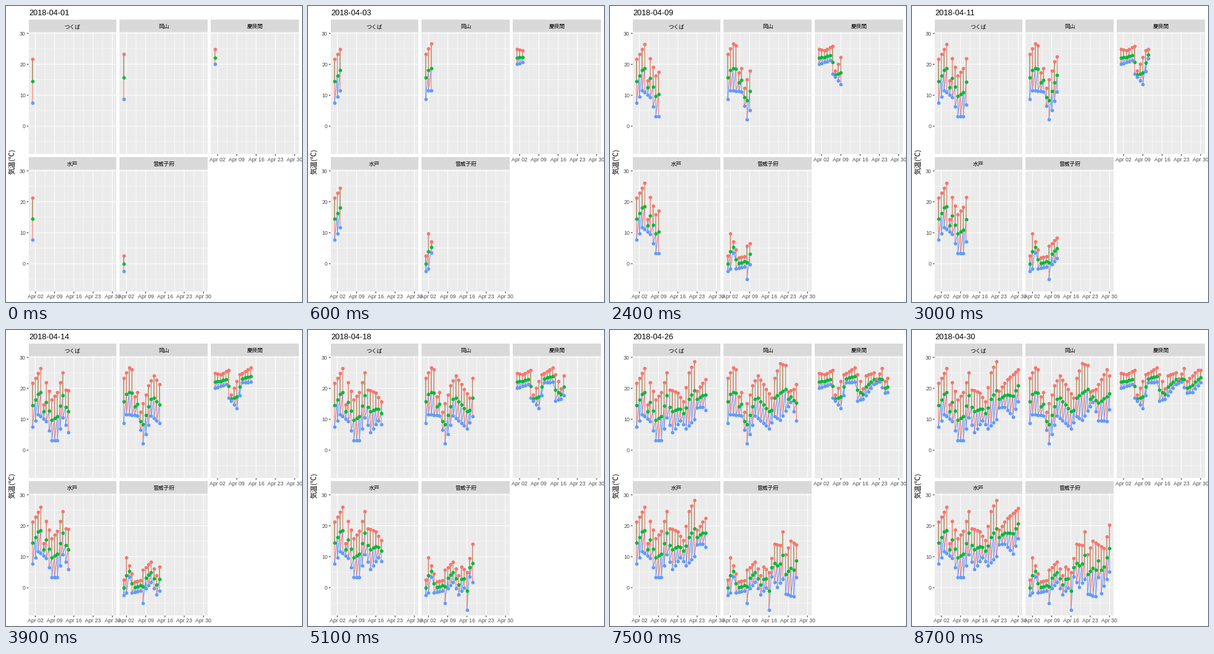
A matplotlib script for the animation above (9000 ms loop, 480x480 px).

```python
import numpy as np
import matplotlib.pyplot as plt
from matplotlib.animation import FuncAnimation
from matplotlib.collections import LineCollection
from matplotlib.patches import Rectangle

SIZE, DPI, DAYS = 480, 72, 30
RED, GREEN, BLUE = "#F8766D", "#00BA38", "#619CFF"
SANS, CJK = "Liberation Sans", "Noto Sans CJK JP"
LEFT, RIGHT, GAP = 36.6, 474.52, 5.5
PANEL_W, PANEL_H, STRIP_H = (RIGHT - LEFT - 2 * GAP) / 3, 198.0, 20.3
TOPS = (42.1, 265.1)
DAY_W, DEG_H = PANEL_W / 31.9, 5.02

fig = plt.figure(figsize=(SIZE / DPI, SIZE / DPI), dpi=DPI, facecolor="white")
ax = fig.add_axes([0, 0, 1, 1])
ax.set_xlim(0, SIZE)
ax.set_ylim(SIZE, 0)
ax.axis("off")


def rect(x, y, w, h, color):
    ax.add_patch(Rectangle((x, y), w, h, fc=color, ec="none", zorder=0))


def rule(xs, ys, color="white", width=1.07):
    ax.plot(xs, ys, color=color, lw=width, solid_capstyle="butt",
            snap=False, zorder=1)


def label(x, y, text, size=8.8, color="#4D4D4D", font=SANS, **kw):
    return ax.text(x, y, text, fontsize=size, color=color, family=font, **kw)


def curve(turns):
    """Daily temperatures running straight between turning points."""
    return np.interp(np.arange(1, DAYS + 1), list(turns), list(turns.values()))


class Panel:
    """One station: strip, grid, axes and the growing zigzag."""

    def __init__(self, name, col, row, high, low, mix=0.5):
        self.left, self.top = LEFT + col * (PANEL_W + GAP), TOPS[row]
        self.bottom = self.top + PANEL_H
        self.draw_frame(name)
        if col == 0:
            self.draw_y_axis()
        if row == 1 or col == 2:
            self.draw_x_axis()

        # each day runs mean -> high -> low, then on to the next mean
        mean = low + mix * (high - low)
        days = np.repeat(np.arange(1, DAYS + 1), 3)
        temps = np.column_stack([mean, high, low]).ravel()
        self.path = np.column_stack([self.x(days), self.y(temps)])
        self.segments = np.stack([self.path[:-1], self.path[1:]], axis=1)
        self.lines = LineCollection([], linewidths=1.07, zorder=2, snap=False,
                                    colors=[GREEN, RED, BLUE])
        ax.add_collection(self.lines)
        self.dots = [ax.plot([], [], "o", ms=5.7, mew=0, color=c,
                             snap=False, zorder=3)[0]
                     for c in (GREEN, RED, BLUE)]

    def x(self, day):
        return self.left + (day + 0.45) * DAY_W

    def y(self, temp):
        return self.top + 152.8 - temp * DEG_H

    def draw_frame(self, name):
        right = self.left + PANEL_W
        rect(self.left, self.top, PANEL_W, PANEL_H, "#EBEBEB")
        rect(self.left, self.top - STRIP_H, PANEL_W, STRIP_H, "#D9D9D9")
        label(self.left + PANEL_W / 2, self.top - 9.6, name, color="black",
              font=CJK, ha="center", va="center_baseline")
        for t in range(-5, 31, 5):
            rule([self.left, right], [self.y(t)] * 2,
                 width=0.53 if t % 10 else 1.07)
        for i in range(9):
            rule([self.x(2 + 3.5 * i)] * 2, [self.top, self.bottom],
                 width=0.53 if i % 2 else 1.07)

    def draw_y_axis(self):
        for t in range(0, 31, 10):
            y = self.y(t)
            rule([self.left - 2.75, self.left], [y, y], "#333333")
            label(self.left - 4.7, y + 3.2, str(t), ha="right", va="baseline")

    def draw_x_axis(self):
        for d in range(2, 31, 7):
            x = self.x(d)
            rule([x, x], [self.bottom, self.bottom + 2.75], "#333333")
            label(x, self.bottom + 11.4, f"Apr {d:02d}",
                  ha="center", va="baseline")

    def show(self, days):
        self.lines.set_segments(self.segments[:3 * days - 1])
        for k, dots in enumerate(self.dots):
            dots.set_data(*self.path[k:3 * days:3].T)


# turning points as day: degrees; the two eastern stations share a climate
east_high = curve({1: 21.6, 4: 26.4, 5: 14.8, 6: 21.8, 8: 16.4, 10: 18.8,
                   12: 25, 13: 19.6, 16: 18.5, 18: 15.7, 20: 25, 22: 28.6,
                   23: 19.2, 26: 22.8, 30: 26})
east_low = curve({1: 7.5, 3: 11.6, 6: 9.4, 8: 3.2, 10: 3.2, 12: 10.6,
                  14: 5.8, 17: 9.5, 19: 7, 22: 10, 23: 13.8, 25: 14,
                  28: 10.8, 30: 15.7})

panels = (
    Panel("つくば", 0, 0, east_high, east_low),
    Panel("水戸", 0, 1, east_high - 0.4, east_low + 0.2),
    Panel("岡山", 1, 0,
          curve({1: 23.3, 3: 26.7, 4: 26.1, 5: 17.3, 6: 18.8, 7: 12.4,
                 10: 20.8, 12: 24, 17: 17, 18: 23.2, 20: 28.1, 22: 27.4,
                 23: 19, 25: 19.8, 29: 26, 30: 24}),
          curve({1: 8.7, 2: 11.6, 6: 11.2, 8: 2.1, 11: 11.1, 14: 8.7,
                 16: 7, 18: 11, 20: 9.7, 22: 12.7, 24: 15.5, 26: 9.6,
                 29: 9.4, 30: 13.2}), 0.48),
    Panel("慶良間", 2, 0,
          curve({1: 24.9, 3: 24.5, 6: 25.9, 7: 17.9, 10: 24.4, 14: 26.7,
                 17: 20, 18: 24.1, 21: 25.1, 22: 23, 24: 26.5, 25: 22.3,
                 29: 25.9}),
          curve({1: 20.1, 5: 21.2, 6: 17, 9: 13.6, 11: 21.8, 14: 22,
                 15: 16, 17: 16.6, 21: 21.2, 23: 22, 25: 18.6, 27: 18.8,
                 30: 21.9}), 0.42),
    Panel("音威子府", 1, 1,
          curve({1: 2.5, 2: 9.7, 5: 1.9, 7: 2.4, 8: 5.7, 11: 8.4, 13: 4,
                 14: 6.8, 16: 5, 18: 14.2, 20: 13.8, 21: 18.2, 22: 10.7,
                 24: 15.2, 28: 12.8, 30: 20.3}),
          curve({1: -2.4, 2: -1.7, 3: 3.5, 4: -1.6, 7: -1, 8: -5, 9: -0.3,
                 11: 1.7, 13: -2.2, 15: 0, 16: -7.1, 17: 3.5, 19: 0.2,
                 21: 2.8, 22: -2, 25: -2.9, 26: 3.3, 27: -1.8, 30: 5.2})),
)

label(9.3, 252.5, "気温(℃)", 11.4, "black", CJK, rotation=90,
      ha="center", va="center")
title = label(37, 15.3, "", 12.8, "black", va="baseline")


def update(i):
    title.set_text(f"2018-04-{i + 1:02d}")
    for p in panels:
        p.show(i + 1)


anim = FuncAnimation(fig, update, frames=DAYS, init_func=lambda: update(0),
                     interval=300, repeat=True, repeat_delay=0)
plt.show()
```
